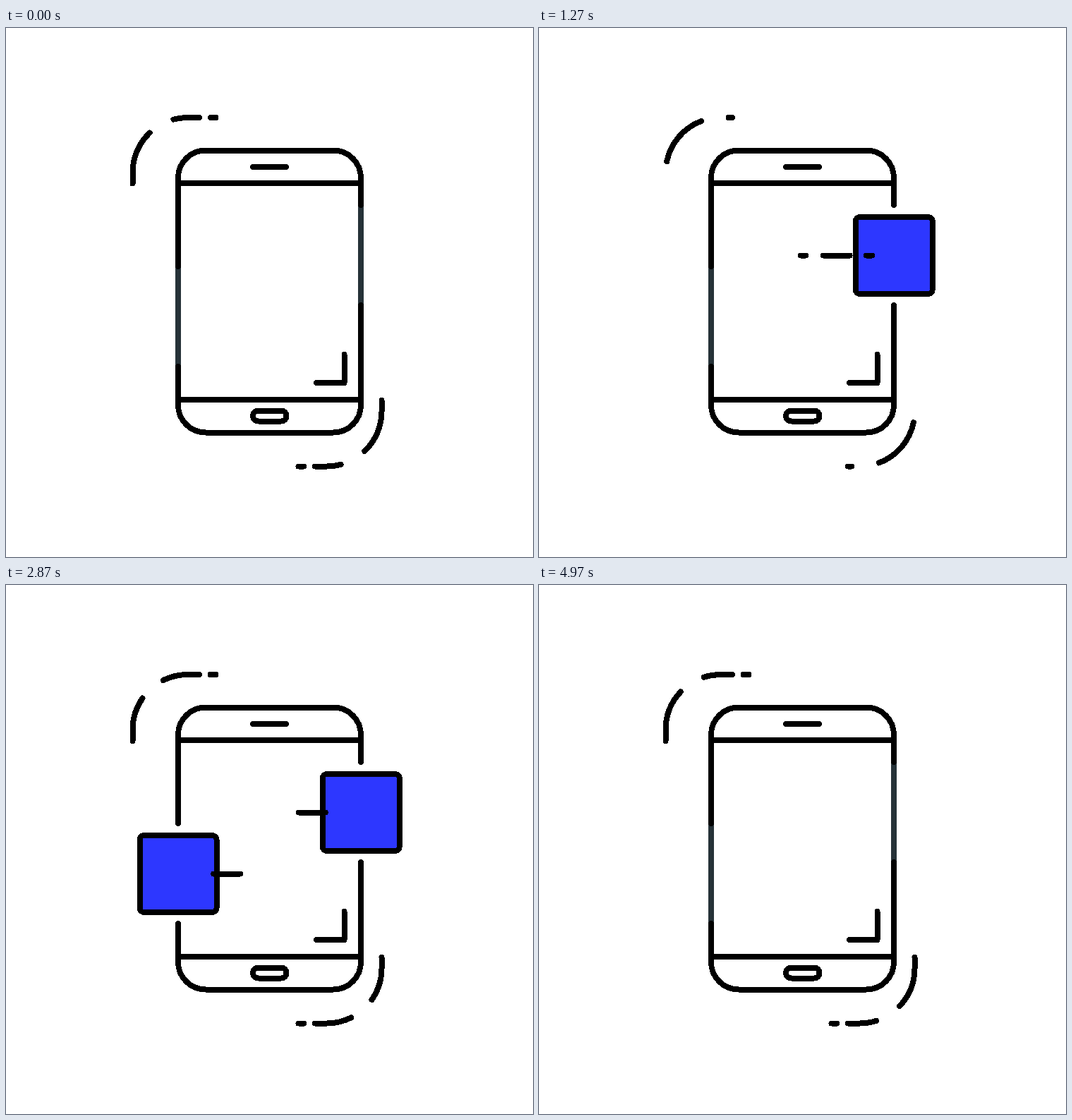
Write an HTML page that moves like this. It is 747 by 750 pixels and loops after 5010 ms.

```html
<!DOCTYPE html>
<html lang="en">
<head>
<meta charset="utf-8">
<title>Phone with sliding tiles</title>
<style>
  html, body { margin: 0; width: 100%; height: 100%; overflow: hidden; background: #fff; }
  svg { display: block; width: 747px; height: 750px; }
  .ink { fill: none; stroke: #000; stroke-width: 8; stroke-linecap: round; stroke-linejoin: round; }
  .slate { stroke: #263238; stroke-width: 8; }
  .tile { fill: #2d37ff; stroke: #000; stroke-width: 8; }
</style>
</head>
<body>
<svg viewBox="0 0 747 750" shape-rendering="crispEdges">
  <defs>
    <rect id="tile" class="tile" x="-54.5" y="-54.5" width="109" height="109" rx="6"/>
    <rect id="halo" x="-70.5" y="-70.5" width="141" height="141" rx="20" fill="#fff"/>
    <path id="arc" class="ink" d="M179.5 221V205A78 78 0 0 1 257.5 127H274M289.5 127H297.5"/>
    <path id="rightLine" class="ink" d="M361.5 322.5H378M393 322.5H472"/>
    <path id="leftLine" class="ink" d="M385.5 409.5H370M354 409.5H275"/>
    <clipPath id="rightClip"><rect class="right" x="-58.5" y="-58.5" width="117" height="117"/></clipPath>
    <clipPath id="leftClip"><rect class="left" x="-58.5" y="-58.5" width="117" height="117"/></clipPath>
  </defs>

  <path class="slate" d="M244 338V480M502.8 251L503.2 393"/>
  <use href="#halo" class="right"/>
  <use href="#halo" class="left"/>

  <g class="ink">
    <path d="M244 338V212.5A39 39 0 0 1 283 173.5H464A39 39 0 0 1 503 212.5V251"/>
    <path d="M503 393V534.5A39 39 0 0 1 464 573.5H283A39 39 0 0 1 244 534.5V480"/>
    <path d="M244 220H503M244 526.5H503M350 197H397M479.5 463V503H440"/>
    <rect x="350" y="542.5" width="47.5" height="15" rx="7.5"/>
  </g>
  <use href="#arc"/>
  <use href="#arc" transform="rotate(180 356 374.25)"/>

  <use href="#rightLine" id="rightUnder"/>
  <use href="#leftLine" id="leftUnder"/>
  <use href="#tile" class="left"/>
  <use href="#tile" class="right"/>
  <g clip-path="url(#rightClip)"><use href="#rightLine" id="rightOver"/></g>
  <g clip-path="url(#leftClip)"><use href="#leftLine" id="leftOver"/></g>
</svg>
<script>
const LOOP = 5010, FRAMES = 150, FPS = 30;
const EXIT = 4.133, PEAK = 4.267, GONE = 4.567;
const $ = id => document.getElementById(id);

const tiles = [
  { side: 'right', delay: 0, y: 322.5, endX: 503.3 },
  { side: 'left', delay: 1, y: 409.5, endX: 244 }
];
for (const tile of tiles) tile.parts = document.querySelectorAll('.' + tile.side);

const ramp = (t, from, to) => Math.min(1, Math.max(0, (t - from) / (to - from)));
const ease = (t, from, to) => {
  const u = ramp(t, from, to);
  return u * u * (3 - 2 * u);
};
const mix = (a, b, u) => a + (b - a) * u;

// Frame starts are rounded to hundredths of a second.
const frameStart = n => Math.round(n * 100 / FPS) * 10 / 1;
function frameAt(ms) {
  let n = Math.round(ms * FPS / 1000);
  if (Math.round(n * 100 / FPS) * 10 > ms) n--;
  return Math.min(FRAMES - 1, Math.max(0, n));
}

function tileScale(t, local) {
  if (t >= EXIT) return t < PEAK ? 1 + 0.05 * ease(t, EXIT, PEAK) : 1.05 * (1 - ease(t, PEAK, GONE));
  return local < 0.7 ? 1.05 * ease(local, 0.4, 0.7) : 1.05 - 0.05 * ease(local, 0.7, 0.833);
}

function setDash(el, dash, gap, end) {
  el.setAttribute('stroke-dasharray', dash + ' ' + gap);
  el.setAttribute('stroke-dashoffset', (dash - end) % (dash + gap));
}

function draw(t) {
  setDash($('arc'), 78.5, 39, 79 + 117.5 * t);
  for (const { side, delay, y, endX, parts } of tiles) {
    const local = t - delay;
    const x = mix(373.8, endX, ease(local, 0.667, 1.267));
    const scale = tileScale(t, local);
    for (const part of parts) {
      part.setAttribute('transform', `translate(${x} ${y}) scale(${scale})`);
      part.setAttribute('visibility', scale > 0.001 ? 'visible' : 'hidden');
    }
    // Half-faded lines show only where they lie on a tile.
    const alpha = ramp(local, 1, 1.133) * (1 - ramp(t, EXIT, PEAK));
    $(side + 'Under').setAttribute('visibility', alpha >= 0.5 ? 'visible' : 'hidden');
    $(side + 'Over').setAttribute('opacity', alpha);
    setDash($(side + 'Line'), 38, 23, 15 + 122 * Math.min(t, EXIT));
  }
}

const begin = performance.now();
function tick() {
  draw(frameAt((performance.now() - begin) % LOOP) / FPS);
  requestAnimationFrame(tick);
}
tick();
</script>
</body>
</html>
```
